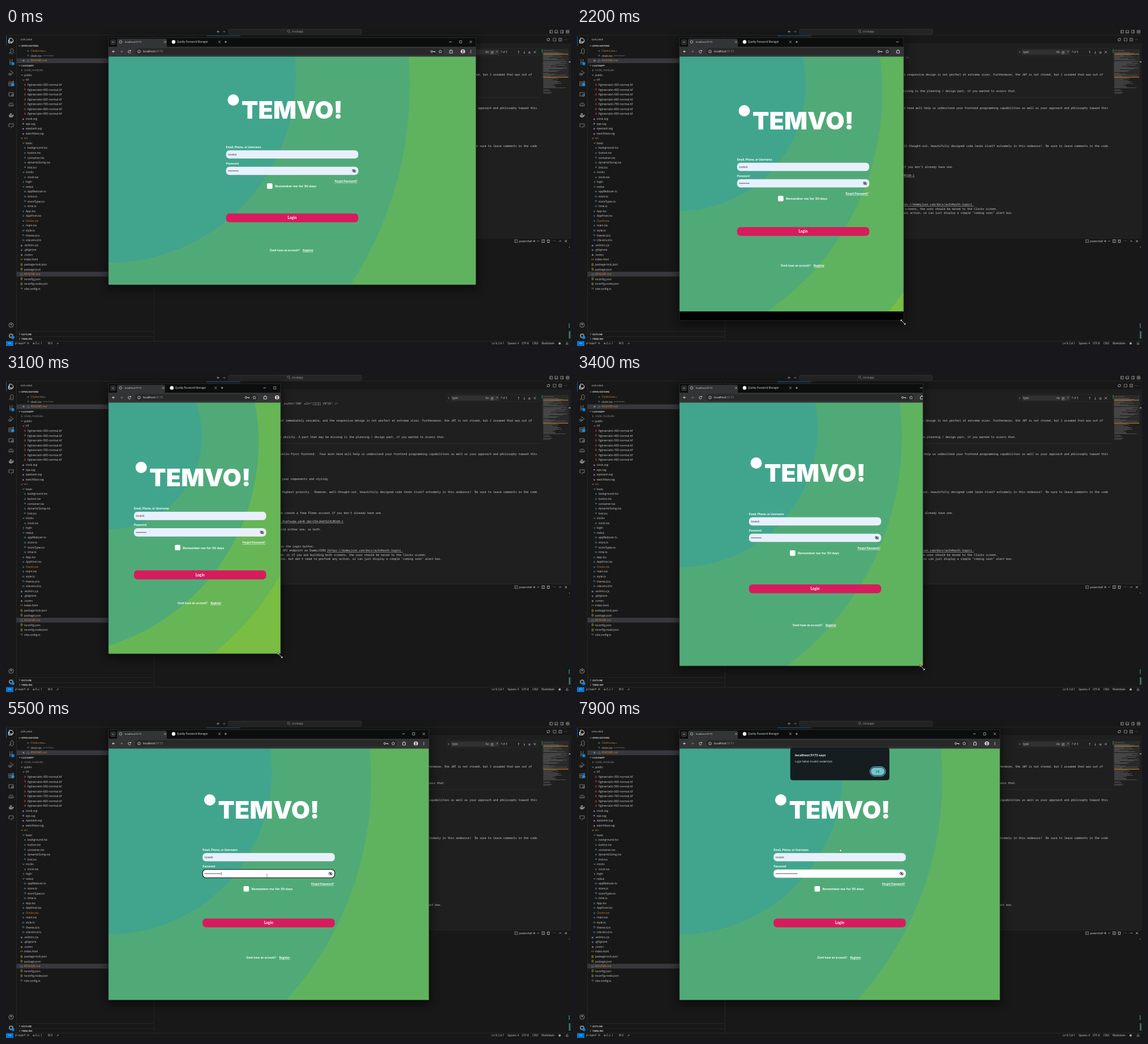
An HTML page that plays this animation: 998x561 px, repeating every 8 s.

```html
<!DOCTYPE html>
<html lang="en">
<head>
<meta charset="utf-8">
<title>Login screen in a resizing window</title>
<style>
html, body { margin: 0; width: 100%; height: 100%; overflow: hidden; background: #181818; }
#stage { display: block; width: 100vw; height: 100vh; }
text { white-space: pre; font-family: "Open Sans", "DejaVu Sans", sans-serif; }
.mono { font-family: "Noto Sans Mono", "Noto Sans CJK JP", monospace; }
.page { font-family: Lato, sans-serif; font-weight: 700; }
.logo { font-family: Inter, sans-serif; font-weight: 900; }
.bold { font-weight: 700; }
.line { text-decoration: underline; }
.mid { text-anchor: middle; }
.end { text-anchor: end; }
#shade { filter: blur(8px); }
</style>
</head>
<body>
<svg id="stage" viewBox="0 0 998 561">
  <g id="editor"></g>
  <rect id="shade" x="178" y="18" fill="#000" opacity=".5"/>
  <g id="browser"></g>
</svg>
<script>
const $ = id => document.getElementById(id);
const esc = s => s.replace(/&/g, '&amp;').replace(/</g, '&lt;');
// y is the middle of the line
const text = (x, y, s, size = 4.9, fill = '#ccc', cls = '') =>
  `<text x="${x}" y="${y + size * .36}" font-size="${size}" fill="${fill}" class="${cls}">${esc(s)}</text>`;
const rect = (x, y, w, h, fill, r = 0, more = '') =>
  `<rect x="${x}" y="${y}" width="${Math.max(0, w)}" height="${Math.max(0, h)}" rx="${r}" fill="${fill}" ${more}/>`;
const disc = (x, y, r, fill, more = '') => `<circle cx="${x}" cy="${y}" r="${r}" fill="${fill}" ${more}/>`;
const icon = (x, y, d, stroke = '#ccc', w = .7, fill = 'none') =>
  `<path transform="translate(${x} ${y})" d="${d}" fill="${fill}" stroke="${stroke}" stroke-width="${w}"/>`;

const CROSS = 'M-2-2L2 2M2-2L-2 2', DOWN = 'M-1.5-.8L0 .8L1.5-.8', RIGHT = 'M-.8-1.5L.8 0L-.8 1.5',
  PLUS = 'M-2 0H2M0-2V2', BACK = 'M2 0H-2M0-2L-2 0L0 2', FORTH = 'M-2 0H2M0-2L2 0L0 2',
  BOX = 'M-2.5-2.5H2.5V2.5H-2.5Z', LENS = 'M-1-1m-2 0a2 2 0 1 0 4 0a2 2 0 1 0-4 0M.6.6L3 3';

// ---------- code editor behind the browser ----------
const TREE = `0>node_modules
0vpublic
1vttf
${[300, 400, 500, 600, 700, 800, 900].map(n => `2 figtree-latin-${n}-normal.ttf`).join('\n')}
1 clock.svg
1 eye.svg
1 eyeslash.svg
1 watchface.svg
0vsrc
1vbasic
2 background.tsx
2 button.tsx
2 container.tsx
2 dynamicSizing.tsx
2 link.tsx
1vclocks
2 clock.tsx
1>login
1vredux
2 appReducer.ts
2 store.ts
2 storeTypes.ts
2 time.ts
1 App.tsx
1 AppHost.tsx
1 Clocks.tsx
1 main.tsx
1 style.ts
1 theme.d.ts
1 vite-env.d.ts
0 .eslintrc.cjs
0 .gitignore
0 .nvmrc
0 index.html
0 package-lock.json
0 package.json
0 README.md
0 tsconfig.json
0 tsconfig.node.json
0 vite.config.ts`.split('\n');

const GLYPHS = {
  ttf: ['A', '#cc3e44'], svg: ['◆', '#a074c4'], tsx: ['⊙', '#519aba'], ts: ['TS', '#519aba'],
  cjs: ['◉', '#8080f2'], gitignore: ['◆', '#6d8086'], nvmrc: ['≡', '#ccc'], html: ['<>', '#e37933'],
  json: ['{}', '#cbcb41'], md: ['ⓘ', '#519aba']
};
const fileIcon = (x, y, name) => {
  const [glyph, color] = GLYPHS[name.split('.').pop()];
  return text(x, y, glyph, glyph === 'TS' ? 3.6 : 4.4, color, 'mid bold');
};

// right end, middle, visible tail of each line
const README = [
  [929, 82, "specifically the CSS is not immediately reusable, and the responsive design is not perfect at extreme sizes. Furthermore, the JWT is not stored, but I assumed that was out of"],
  [776, 111.5, "excellent test of developer ability. A part that may be missing is the planning / design part, if you wanted to assess that."],
  [938, 141, "one or two screens of a mobile-first frontend.  Your work here will help us understand your frontend programming capabilities as well as your approach and philosophy toward this"],
  [448, 178, "aesthetic details."],
  [571, 185.5, "responsiveness, and reusability of your components and styling."],
  [472, 193, "in the provided codebase."],
  [938, 208, "great to the end-user is the highest priority.  However, well-thought-out, beautifully designed code lends itself extremely in this endeavor!  Be sure to leave comments in the code"],
  [665, 245, "a at the link below.  You can create a free Plemo account if you don't already have one."],
  [596, 260, "WL0fWwzO0NLLKgt/TEMVO!-Front-End?node-id=0-1&t=Z9AJAdXSUlBJM160-1", 'line'],
  [557, 274.5, "available.  You can choose to build either one, or both."],
  [545, 304, "username and password and press the Login button."],
  [566, 311.5, "the app should call the [Login API endpoint on DummyJSON]"],
  [701, 311.5, "(https://dummyjson.com/docs/auth#auth-login).", 'line'],
  [743, 319, "this message should be displayed- or if you are building both screens, the user should be moved to the Clocks screen."],
  [770, 326.5, "\"Remember me\" should be tappable, but don't need to perform any action, or can just display a simple \"coming soon\" alert box."],
  [422, 356, "clocks."],
  [471, 363.5, "the clocks if so desired."]
];

function minimap() {
  let seed = 7, s = '';
  const rnd = () => (seed = seed * 16807 % 2147483647) / 2147483647;
  for (let y = 38; y < 115; y += 1.6)
    if (rnd() > .25) s += rect(949, y, 8 + rnd() * 36, .7, '#777', 0, 'opacity=".8"');
  for (const y of [45.5, 86]) s += rect(949, y, 44, 1.2, '#b97a25');
  return rect(947, 37, 47, 51, '#fff', 0, 'opacity=".05"') + s +
    rect(946.5, 37, 1, 7, '#2ea043') + rect(994, 59, 3, 1.5, '#aaa');
}

function editor() {
  let s = rect(0, 0, 998, 561, '#181818') + rect(261, 13, 737, 357, '#1f1f1f') + rect(261, 13, 737, 14, '#181818');
  // borders
  for (const [x, y, w, h] of [[0, 12.5, 998, .5], [18, 13, .5, 539], [261, 13, .5, 539], [261, 370, 737, .5],
    [261, 122, 684, .5], [18, 535.5, 243, .5], [18, 544, 243, .5], [0, 552, 998, .5]]) s += rect(x, y, w, h, '#353535');
  // title bar
  s += icon(375, 6.5, BACK) + icon(385, 6.5, FORTH, '#777') + rect(393, 2, 235, 9, '#242424', 2, 'stroke="#444" stroke-width=".5"') +
    icon(500, 6.5, LENS, '#aaa', .5) + text(505, 6.5, 'clockapp', 4.8, '#aaa');
  for (const [x, d] of [[963, 'M-.8-2.5V2.5'], [972, 'M-2.5.8H2.5'], [982, 'M.8-2.5V2.5'], [992, 'M0-2.5V2.5M-2.5 0H2.5']])
    s += icon(x, 6.5, BOX + d, '#bbb', .6);
  // tab
  s += rect(354, 13, 60, 14, '#1f1f1f') + rect(354, 13, 60, .7, '#0078d4') + icon(409, 20.5, CROSS);
  s += icon(958, 20.5, 'M-2-2V2H1M2 2V-2H-1') + icon(969, 20.5, BOX, '#bbb', .6) + icon(979, 20.5, BOX + 'M0-2.5V2.5', '#bbb', .6) + text(986, 20, '···', 6);
  // activity bar
  const bar = ['M-3-4H1L3.5-1.5V2.5H-3ZM-3-1H-4.5V4.5H1.5V2.5', 'M-.5 0a2.7 2.7 0 1 0 4 0a2.7 2.7 0 1 0-4 0M-.2 1.2L-4 4.5', 'M-2-3V3M2-3C2 1-2 0-2 2M-3-4h2M1-4h2M-3 4h2',
    'M-2-4L4 0L-2 4M-4 1h4v3h-4z', 'M-4-3H0V4H-4ZM-4 .5H4V4H0M2-4H4.5V-1.5H2Z', 'M-4-3H4V3H-4ZM1 0h3v3H1Z',
    'M-4 0L-2-2.5H2L4 0V2.5H-4ZM-1-.5v2M1-.5v2', 'M-4 0H3L4.5-1Q4 3.5-1 3.5Q-4 3-4 0M-2-1v-2h3v2', 'M-4-3H4V2H0M-4-3V2H-2M-1 4h2'];
  [22, 41, 60, 79, 98, 117, 135, 154, 172].forEach((y, i) => s += icon(9, y, bar[i], i ? '#858585' : '#fff', .9, i === 7 ? '#858585' : 'none'));
  s += rect(0, 14, .8, 17, '#0078d4');
  s += disc(9, 524, 4, 'none', 'stroke="#858585"') + disc(9, 523, 1.5, '#858585') + disc(9, 543, 3, 'none', 'stroke="#858585" stroke-width="2"');
  for (const y of [63, 100, 546]) s += disc(12, y, 3, '#0078d4') + text(12, y, y === 100 ? '4' : '1', 3.2, '#fff', 'mid');
  // explorer
  s += text(26, 20, 'EXPLORER', 4.2) + icon(24, 31.5, DOWN) + text(27, 31.5, 'OPEN EDITORS', 4.2, '#ccc', 'bold');
  s += rect(18.5, 53.5, 242, 8.5, '#37373d') + rect(18.5, 430, 242, 8.5, '#37373d');
  [['Clocks.tsx', 'src', '#c8883a'], ['clock.tsx', 'src\\clocks', '#ccc'], ['README.md', '', '#c8883a']].forEach(([name, dir, fill], i) => {
    const y = 40.3 + i * 8.6;
    s += fileIcon(39, y, name) + text(43.5, y, name, 4.9, fill) + text(65, y, dir, 4.3, '#888');
  });
  s += icon(31, 57.5, 'M-1.5-1.5L1.5 1.5M1.5-1.5L-1.5 1.5') + icon(24, 66, DOWN) + text(27, 66, 'CLOCKAPP', 4.2, '#ccc', 'bold');
  TREE.forEach((row, i) => {
    const x = 32 + 3 * row[0], y = 74.6 + i * 8.565, kind = row[1], name = row.slice(2);
    const fill = /^(src|Clocks.tsx|README.md)$/.test(name) ? '#c8883a' : kind === '>' && !i ? '#888' : '#ccc';
    s += (kind === ' ' ? fileIcon(x - 4.5, y, name) : icon(x - 4, y, kind === 'v' ? DOWN : RIGHT)) + text(x, y, name, 4.9, fill);
  });
  s += icon(24, 540, RIGHT) + text(27, 540, 'OUTLINE', 4.2, '#ccc', 'bold') + icon(24, 548.3, RIGHT) + text(27, 548.3, 'TIMELINE', 4.2, '#ccc', 'bold');
  // document
  s += text(398, 52.2, 'om/4row-currentcolor-full.svg"', 4.98, '#ce9178', 'mono line') +
    text(491, 52.2, 'width="300" alt="囗囗囗 VRTSK" />', 4.98, '#b5a6a0', 'mono');
  for (const [x, y, line, cls = ''] of README) s += text(x, y, line, 4.98, '#ccc', 'mono end ' + cls);
  // find box
  s += rect(779, 36, 163, 13, '#202020', 1, 'stroke="#303030" stroke-width=".5"') + rect(786, 38, 85, 9, '#313131') + icon(782, 42.5, RIGHT) +
    text(788, 42.5, 'type', 4.9) + text(847, 42.5, 'Aa', 4.6) + text(856, 42.5, 'ab', 4.6, '#ccc', 'line') + text(865, 42.5, '.*', 4.6) +
    text(873.5, 42.5, '7 of 3', 4.6) + text(903, 42.5, '↑', 6) + text(913, 42.5, '↓', 6) + text(922, 42.5, '≡', 6) + icon(934, 42.5, CROSS);
  s += minimap();
  // panel
  s += text(407, 376.3, 'COMMENTS', 4.2, '#999') + icon(901, 376, BOX + 'M-1-1L0 0L-1 1', '#ccc', .5) + text(906, 376, 'powershell', 4.6) +
    icon(933, 376, PLUS) + icon(940, 376, DOWN) + icon(949, 376, BOX + 'M0-2.5V2.5', '#ccc', .6) + icon(958, 376, 'M-2.5-2H2.5M-1.7-2V2.5H1.7V-2', '#ccc', .8) +
    text(966, 375, '···', 6) + icon(979, 376, 'M-2 1L0-1L2 1') + icon(989, 376, CROSS) + rect(994, 386, 2, 1, '#888');
  s += rect(994, 521, 1.5, 8, '#1a8f9c') + rect(994, 535, 3, 13, '#3b6f63');
  // status bar
  s += rect(0, 552.5, 13, 9, '#0078d4') + text(6.5, 556.5, '><', 4.5, '#fff', 'mid') + icon(18, 556.5, 'M-1-2V2M1.3-2V-1L-1 1', '#ccc', .6) + text(21, 556.5, 'main*', 4.7) +
    text(37, 556.5, '⟳', 5) + text(47, 556.5, '⊗ 0 ⚠ 1', 4.6) + text(74, 556.5, 'W 0', 4.6) + text(89, 556.5, '⇗', 5);
  for (const [x, label] of [[858, 'Ln 9, Col 1'], [886, 'Spaces: 4'], [911, 'UTF-8'], [930, 'CRLF'], [946, 'Markdown']]) s += text(x, 556.5, label, 4.6);
  return s + disc(978, 556.5, 2, '#aaa') + icon(991, 556.5, 'M-2 1.5H2L1.2 0V-1Q0-3-1.2-1V0Z', '#ccc', .6);
}

// ---------- browser ----------
// time, right edge, bottom edge, page right, toolbar right, gap under page, logo, first label, button, footer
const LAYOUT = [
  [2000, 830, 453, 830, 830, 0, 145, 210, 335, 392],
  [2200, 577, 516, 618, 611, 16, 164, 232, 359, 419],
  [2700, 401, 479, 411, 404, 0, 188, 231, 338, 378],
  [2900, 401, 479, 401, 401, 0, 188, 231, 338, 378],
  [3400, 611, 515, 660, 653, 0, 175, 247, 379, 443],
  [3700, 788, 510, 788, 788, 0, 170, 241, 371, 434],
  [3900, 753, 497, 767, 760, 0, 159, 229, 357, 419],
  [4100, 747, 494, 747, 747, 0, 159, 229, 358, 419]
];
const POINTER = [[4200, 747, 495], [4700, 461, 275], [5900, 461, 275], [6400, 467, 360], [7000, 467, 360], [7700, 469, 298], [7900, 464, 230]];

function at(keys, t) {
  const i = keys.findIndex(k => k[0] > t);
  if (i === 0) return keys[0].slice(1);
  if (i < 0) return keys[keys.length - 1].slice(1);
  const a = keys[i - 1], b = keys[i], u = (t - a[0]) / (b[0] - a[0]);
  return a.map((v, j) => v + (b[j] - v) * u).slice(1);
}

function page(t, right, bottom, y) {
  const [logoY, labelY, loginY, footY] = y, w = right - 181, mid = 181 + w / 2;
  const form = Math.min(233.5, w * .775), left = mid - form / 2, edge = mid + form / 2;
  const lime = Math.min(70, Math.max(0, (400 - w) * .41)), cy = 139 - .057 * w;
  let s = rect(181, 50.5, 830, 500, '#79bd42') +
    disc(71, cy, 1.24 * w + 74, `color-mix(in srgb, #5fb35f, #79bd42 ${lime}%)`) +
    disc(71, cy, .82 * w + 110, '#50aa78') + disc(181, 135 - .08 * w, .51 * w, '#41a58d');
  // wordmark
  s += `<g transform="translate(${mid} ${logoY}) scale(${form / 233.5})">` + disc(-104, -18, 10, '#fff') + text(0, 0, 'TEMVO!', 43, '#fff', 'logo mid') + '</g>';
  const field = (cy, fill, more = '') => rect(left, cy - 7.3, form, 14.6, fill, 6, more);
  const white = (x, cy, label, size, cls = '') => text(x, cy, label, size, '#fff', 'page ' + cls);
  const pw = labelY + 42, focus = t >= 4800 && t < 6400, typed = t > 5000;
  const count = 9 + Math.min(10, Math.max(0, Math.floor((t - 5000) / 100)));
  s += white(left, labelY, 'Email, Phone, or Username', 5.2) + field(labelY + 13, '#e8f0fe') + text(left + 3.5, labelY + 13, 'tovesk', 5, '#333');
  s += white(left, labelY + 29, 'Password', 5.2) + field(pw, typed ? '#fff' : '#e8f0fe', focus ? 'stroke="#111" stroke-width="1.1"' : '');
  for (let i = 0; i < count; i++) s += disc(left + 4.5 + i * 2.05, pw, .75, '#222');
  if (focus) s += rect(left + 4.5 + count * 2.05, pw - 3, .6, 6, '#111');
  s += icon(edge - 7.5, pw, 'M-3.5 0Q0-4.5 3.5 0Q0 4.5-3.5 0M-3-3L3 3', '#222', .9) + disc(edge - 7.5, pw, 1.2, '#222');
  s += white(edge - 1.5, labelY + 60, 'Forgot Password?', 5.1, 'end line');
  s += rect(mid - 44.5, labelY + 64, 9.7, 9.7, '#fff', 2) + white(mid - 30.5, labelY + 69, 'Remember me for 30 days', 6.3);
  s += rect(left, loginY - 7.8, form, 15.6, '#d81b5c', 6) + white(mid, loginY, 'Login', 6.7, 'mid');
  s += white(mid - 39.5, footY, 'Dont have an account?', 5.2) + white(mid + 18.5, footY, 'Register', 5.2, 'line');
  return s;
}

function toolbar(c) {
  const tab = Math.min(93, (c - 181) * .28), two = 197 + tab;
  let s = rect(181, 17, 830, 16, '#0c0d0d') + rect(196, 19, tab - 5, 16, '#333435', 3) + rect(181, 33, 830, 17.5, '#333435') +
    rect(228, 35.5, c - 285, 12, '#282828', 6);
  s += rect(184, 20, 10, 10, '#2a2b2c', 3) + icon(189, 25, DOWN, '#eee') + disc(202.5, 24.5, 2.2, 'none', 'stroke="#ccc" stroke-width=".8"') +
    text(210, 24.5, 'localhost:5173', 4.3, '#eee') + icon(188 + tab, 24.5, CROSS, '#ddd', .6);
  s += disc(two + 6, 24.5, 3.2, '#fff') + text(two + 12, 24.5, 'Quelby Password Manager'.slice(0, tab < 85 ? 12 : 99), 4.4, '#ddd') +
    icon(two + tab - 6 - 10 * (1 - tab / 93), 24.5, CROSS, '#ddd', .6) + icon(two + tab + 5, 24.5, PLUS, '#ddd');
  s += icon(c - 45, 24.5, 'M-2.3 0H2.3', '#ddd') + icon(c - 27, 24.5, 'M-2-2H2V2H-2Z', '#ddd', .6) + icon(c - 9, 24.5, CROSS, '#ddd');
  s += icon(190, 41.5, BACK, '#eee', .9) + icon(204, 41.5, FORTH, '#777', .9) + icon(218, 41.5, 'M2-1A2.3 2.3 0 1 0 2.2 1M2.4-2.6V-.8H.6', '#eee', .8);
  s += disc(235, 41.5, 2.5, 'none', 'stroke="#ddd" stroke-width=".7"') + rect(234.6, 41, .8, 1.6, '#ddd') +
    `<text x="242" y="43.4" font-size="5.2" fill="#eee">localhost<tspan fill="#999">:5173</tspan></text>`;
  s += disc(c - 78, 41.5, 1.6, 'none', 'stroke="#ddd" stroke-width=".9"') + icon(c - 76, 41.5, 'M0 0H4V1.5M2.5 0V1.3', '#ddd', .9) +
    icon(c - 63, 41.5, 'M0-3L.9-1L3-.8L1.4.6L1.9 2.7L0 1.6L-1.9 2.7L-1.4.6L-3-.8L-.9-1Z', '#ddd', .6) +
    icon(c - 44, 41.5, 'M-2.5-1.5H-.8V-3H.8V-1.5H2.5V2.7H-2.5Z', '#ddd', .9);
  s += disc(c - 23, 41.5, 3.8, '#e4dcd8') + disc(c - 23, 40.5, 1.4, '#5a3a34') + icon(c - 23, 44, 'M-2.4.6Q0-3.4 2.4.6Z', 'none', 0, '#5a3a34');
  for (const dy of [-2, 0, 2]) s += disc(c - 9, 41.5 + dy, .65, '#ddd');
  return s;
}

const alertBox = () => rect(377, 49, 174.5, 57, '#151d21', 4, 'stroke="#0d1214" stroke-width=".5"') +
  text(385, 62, 'localhost:5173 says', 5.7, '#eee', 'bold') + text(385, 73.3, 'Login failed: Invalid credentials', 4.6, '#ddd') +
  rect(517.5, 82.5, 27.5, 16.5, 'none', 8.2, 'stroke="#7fd3df" stroke-width="1"') + rect(519, 84, 24.5, 13.5, '#72c4d0', 6.7) +
  text(531.2, 90.8, 'OK', 5, '#123f49', 'mid');

function pointer(t, right, bottom) {
  if (t < 1000) return '';
  if (t < 4200) return icon(right - 1, bottom + 3, 'M-4-1.5V-4H-1.5M-4-4L4 4M4 1.5V4H1.5', '#000', 1.8) +
    icon(right - 1, bottom + 3, 'M-4-1.5V-4H-1.5M-4-4L4 4M4 1.5V4H1.5', '#fff', .9);
  const [x, y] = at(POINTER, t);
  if (t >= 4700 && t < 6000) return icon(x, y, 'M-1-3H1M0-3V3M-1 3H1', '#555', .6);
  return icon(x, y - 3, 'M0 0V6L1.4 4.7L2.4 7L3.3 6.6L2.3 4.4H4.2Z', '#222', .4, '#fff');
}

function draw(t) {
  const [right, bottom, pageRight, bar, gap, ...ys] = at(LAYOUT, t), w = right - 181, h = bottom - 17;
  $('shade').setAttribute('width', w + 6);
  $('shade').setAttribute('height', h + 6);
  $('browser').innerHTML =
    `<svg x="181" y="17" width="${w}" height="${h}" viewBox="181 17 ${w} ${h}">` +
    page(t, pageRight, bottom, ys) + rect(181, bottom - gap, w, gap, '#000') + toolbar(bar) + '</svg>' +
    rect(181, 17, w, h, 'none', 1, 'stroke="#3c4142" stroke-width=".6"') +
    (t >= 7000 ? alertBox() : '') + pointer(t, right, bottom);
}

$('editor').innerHTML = editor();
let last = -1;
const start = performance.now();
function tick() {
  const t = Math.floor((performance.now() - start) % 8000 / 100) * 100;
  if (t !== last) draw(last = t);
  requestAnimationFrame(tick);
}
tick();
</script>
</body>
</html>
```
